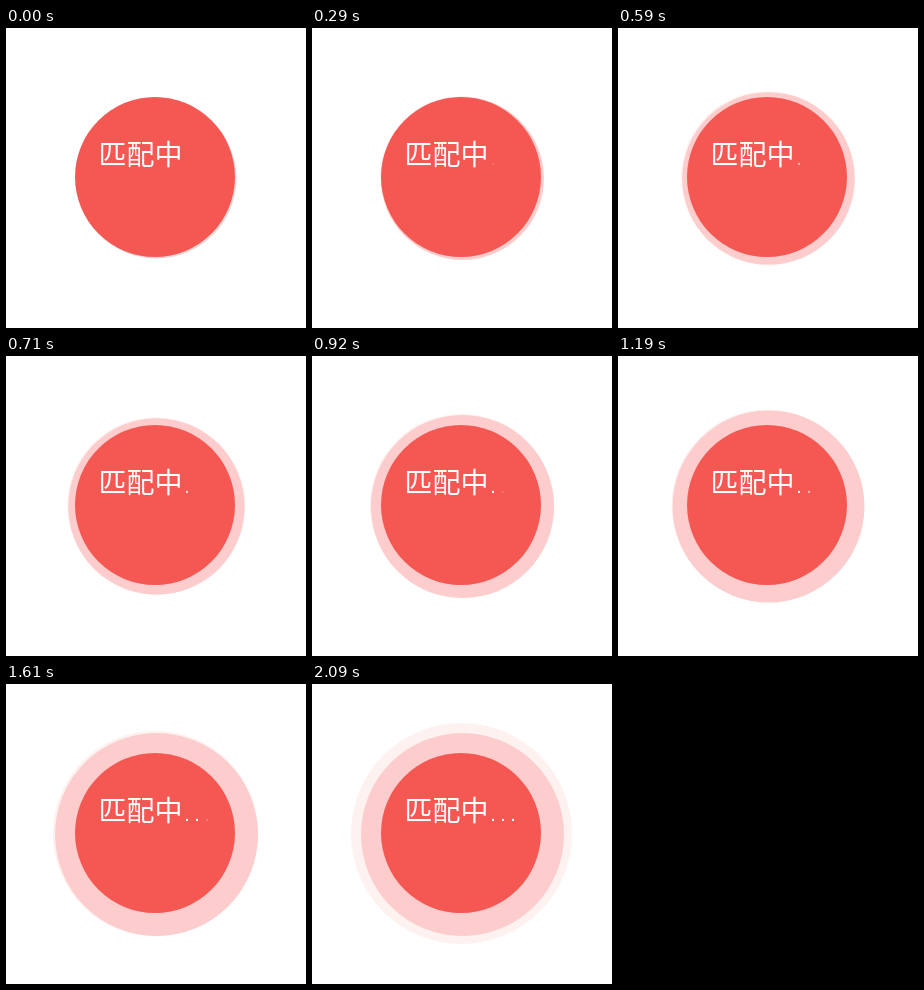
An HTML page for the animation above (2.72 s loop, 300x300 px).

```html
<!DOCTYPE html>
<html lang="zh">
<head>
<meta charset="utf-8">
<style>
  html, body { margin: 0; width: 100%; height: 100%; overflow: hidden; background: #fff; }
  svg { display: block; width: 300px; height: 300px; }
  text { fill: #fff; font: 28px "Noto Sans CJK SC", "Noto Sans CJK", sans-serif; }
  .dot { font: 20px "Liberation Sans", sans-serif; }
</style>
</head>
<body>
<svg viewBox="0 0 300 300">
  <circle id="halo" cx="149.5" cy="149.5" fill="#fef2f1"/>
  <circle id="ring" cx="150.5" cy="150.5"/>
  <circle cx="149" cy="149" r="80" fill="#f55753"/>
  <text x="92.5" y="137">匹配中</text>
  <text class="dot" x="178.2" y="137">.</text>
  <text class="dot" x="188.2" y="137">.</text>
  <text class="dot" x="198.2" y="137">.</text>
</svg>
<script>
  const LOOP = 2720, START = 230, STEP = 30, STEPS = 63;
  const RADIUS = 80, HALO = 30.5, RING = 21.5;
  const halo = document.getElementById('halo');
  const ring = document.getElementById('ring');
  const dots = document.querySelectorAll('.dot');
  const clamp = v => Math.min(1, Math.max(0, v));

  function draw(now) {
    const t = now % LOOP;
    const p = clamp((Math.floor((t - START) / STEP) + 1) / STEPS);
    const spread = HALO * p;

    halo.setAttribute('r', RADIUS + spread);
    ring.setAttribute('r', RADIUS + Math.min(RING, spread));
    // At rest the ring is only a soft grey shadow
    ring.setAttribute('fill', p ? '#fccdcc' : '#e6d9d9');
    dots.forEach((dot, i) => dot.style.opacity = clamp(p * 3 - i));
  }

  const origin = performance.now();
  function tick() {
    draw(performance.now() - origin);
    requestAnimationFrame(tick);
  }
  tick();
</script>
</body>
</html>
```
